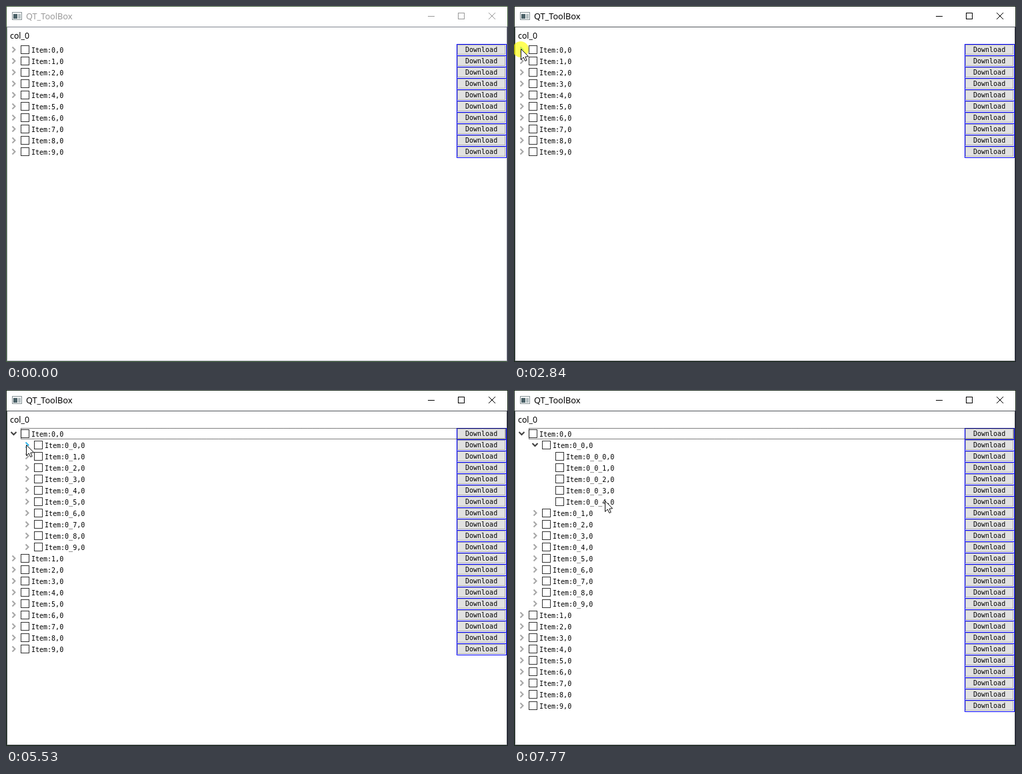
These frames come from a looping animation (752 by 534 pixels, 8 s). An HTML page with a canvas:

```html
<!DOCTYPE html>
<html lang="en">
<head>
<meta charset="utf-8">
<title>QT_ToolBox</title>
<style>
html, body { margin: 0; width: 100%; height: 100%; overflow: hidden; }
canvas { display: block; }
</style>
</head>
<body>
<canvas id="stage" width="752" height="534"></canvas>
<script>
const ctx = document.getElementById('stage').getContext('2d');
const LOOP = 8000, STEP = 77.15, FIRST_STEP = 210;
const ROW_H = 17, TOP = 57, INDENT = 20;
const CLICKS = [2840, 5930], EXPANDS = [2910, 5930], GLOW_MS = 75;
const MONO = '10px "DejaVu Sans Mono", monospace';
const SANS = '"Noto Sans", sans-serif';

const linear = u => u;
const easeIn = u => u * u;
const easeOut = u => 1 - (1 - u) ** 3;
const easeInOut = u => u * u * (3 - 2 * u);

const ENTRY = [600, 523];
const MOVES = [
  { from: 210, to: 750, end: [262, 370], ease: easeIn },
  { from: 750, to: 980, end: [50, 139], ease: linear },
  { from: 980, to: 1600, end: [10, 64], ease: easeOut },
  { from: 3295, to: 3450, end: [17, 74], ease: linear },
  { from: 3525, to: 3910, end: [28, 82], ease: linear },
  { from: 5455, to: 5530, end: [30, 82], ease: linear },
  { from: 6545, to: 7090, end: [143, 187], ease: easeInOut },
  { from: 7090, to: 7240, end: [140, 173], ease: linear },
  { from: 7315, to: 7770, end: [136, 166], ease: linear }
];

function pointerAt(time) {
  if (time < FIRST_STEP) return null;
  // The pointer is sampled about 13 times a second.
  const t = FIRST_STEP + STEP * Math.floor((time - FIRST_STEP + 14) / STEP);
  let [x, y] = ENTRY;
  for (const { from, to, end, ease } of MOVES) {
    const k = ease(Math.min(1, Math.max(0, (t - from) / (to - from))));
    x += (end[0] - x) * k;
    y += (end[1] - y) * k;
  }
  return [Math.round(x), Math.round(y)];
}

function visibleRows(openLevels) {
  const rows = [];
  const add = (prefix, depth, count) => {
    for (let i = 0; i < count; i++) {
      const id = prefix + i;
      const open = i === 0 && depth < openLevels;
      rows.push({ label: `Item:${id},0`, depth, open, leaf: depth === 2 });
      if (open) add(id + '_', depth + 1, depth ? 5 : 10);
    }
  };
  add('', 0, 10);
  return rows;
}

function rect(color, x, y, w, h) {
  ctx.fillStyle = color;
  ctx.fillRect(x, y, w, h);
}

function box(color, x, y, w, h) {
  ctx.strokeStyle = color;
  ctx.lineWidth = 1;
  ctx.strokeRect(x + .5, y + .5, w - 1, h - 1);
}

function line(color, width, ...points) {
  ctx.strokeStyle = color;
  ctx.lineWidth = width;
  ctx.beginPath();
  points.forEach(([x, y]) => ctx.lineTo(x, y));
  ctx.stroke();
}

function text(string, x, y, font, color = '#000') {
  ctx.font = font;
  ctx.fillStyle = color;
  ctx.fillText(string, x, y);
}

function drawWindow(active) {
  const ink = active ? '#000' : '#999';
  rect(active ? '#1b2a1c' : '#3b5a35', 0, 0, 752, 534);
  rect(active ? '#1c1c2b' : '#3b3a4c', 751, 30, 1, 504);
  rect('#fff', 1, 1, 750, 532);
  box(active ? '#50555a' : '#828790', 1, 31, 750, 502);

  rect('#f4f6f6', 9, 9, 15, 12);
  box('#8b9699', 9, 9, 15, 12);
  rect('#4c6268', 11, 12, 6, 7);
  rect('#b5c0c2', 18, 12, 4, 7);

  text('QT_ToolBox', 30, 20, '12.7px ' + SANS, ink);
  line(ink, 1, [632, 15.5], [642, 15.5]);
  box(ink, 677, 10, 10, 10);
  line(ink, 1, [723, 10], [733, 20]);
  line(ink, 1, [733, 10], [723, 20]);
  text('col_0', 6, 49, '12.3px ' + SANS);
}

function drawChevron(x, y, open, hover) {
  const color = hover ? '#35b9ec' : open ? '#404040' : '#a6a6a6';
  if (open) line(color, 2, [x - 4, y - 2.5], [x, y + 1.5], [x + 4, y - 2.5]);
  else line(color, 2, [x - 2, y - 4], [x + 2, y], [x - 2, y + 4]);
}

function drawButton(y) {
  rect('#e1e1e1', 676, y + 1, 72, 15);
  box('#adadad', 676, y + 1, 72, 15);
  box('#00f', 675, y, 75, ROW_H + 1);
  text('Download', 688, y + 12, MONO);
}

function drawRow(row, index, pointer) {
  const y = TOP + index * ROW_H, x = 2 + row.depth * INDENT;
  const hover = pointer && pointer[0] >= x && pointer[0] < x + INDENT &&
    pointer[1] >= y && pointer[1] < y + ROW_H;
  if (!row.leaf) drawChevron(x + 9.5, y + 8.5, row.open, hover);
  box('#333', x + 20, y + 2, 13, 13);
  text(row.label, x + 36, y + 13, MONO);
  drawButton(y);
}

function drawFocus() {
  ctx.setLineDash([1, 1]);
  box('#000', 22, TOP, 727, ROW_H);
  ctx.setLineDash([]);
}

function drawGlow([x, y]) {
  ctx.fillStyle = 'rgba(255, 255, 0, .65)';
  ctx.beginPath();
  ctx.arc(x, y + 1, 12, 0, 2 * Math.PI);
  ctx.fill();
}

function drawPointer([x, y]) {
  const arrow = new Path2D(
    'M.5 .5V16.5L4.2 13L6.8 18.5L9.2 17.4L6.8 12.2L11.6 11.7Z');
  ctx.save();
  ctx.translate(x, y);
  ctx.fillStyle = '#fff';
  ctx.fill(arrow);
  ctx.strokeStyle = '#111';
  ctx.lineWidth = 1;
  ctx.stroke(arrow);
  ctx.restore();
}

function draw(time) {
  const openLevels = EXPANDS.filter(e => time >= e).length;
  const pointer = pointerAt(time);
  drawWindow(time >= CLICKS[0]);
  visibleRows(openLevels).forEach((row, i) => drawRow(row, i, pointer));
  if (openLevels) drawFocus();
  if (CLICKS.some(c => time >= c && time < c + GLOW_MS)) drawGlow(pointer);
  if (pointer) drawPointer(pointer);
}

const start = performance.now();
function tick() {
  draw((performance.now() - start) % LOOP);
  requestAnimationFrame(tick);
}
tick();
</script>
</body>
</html>
```
